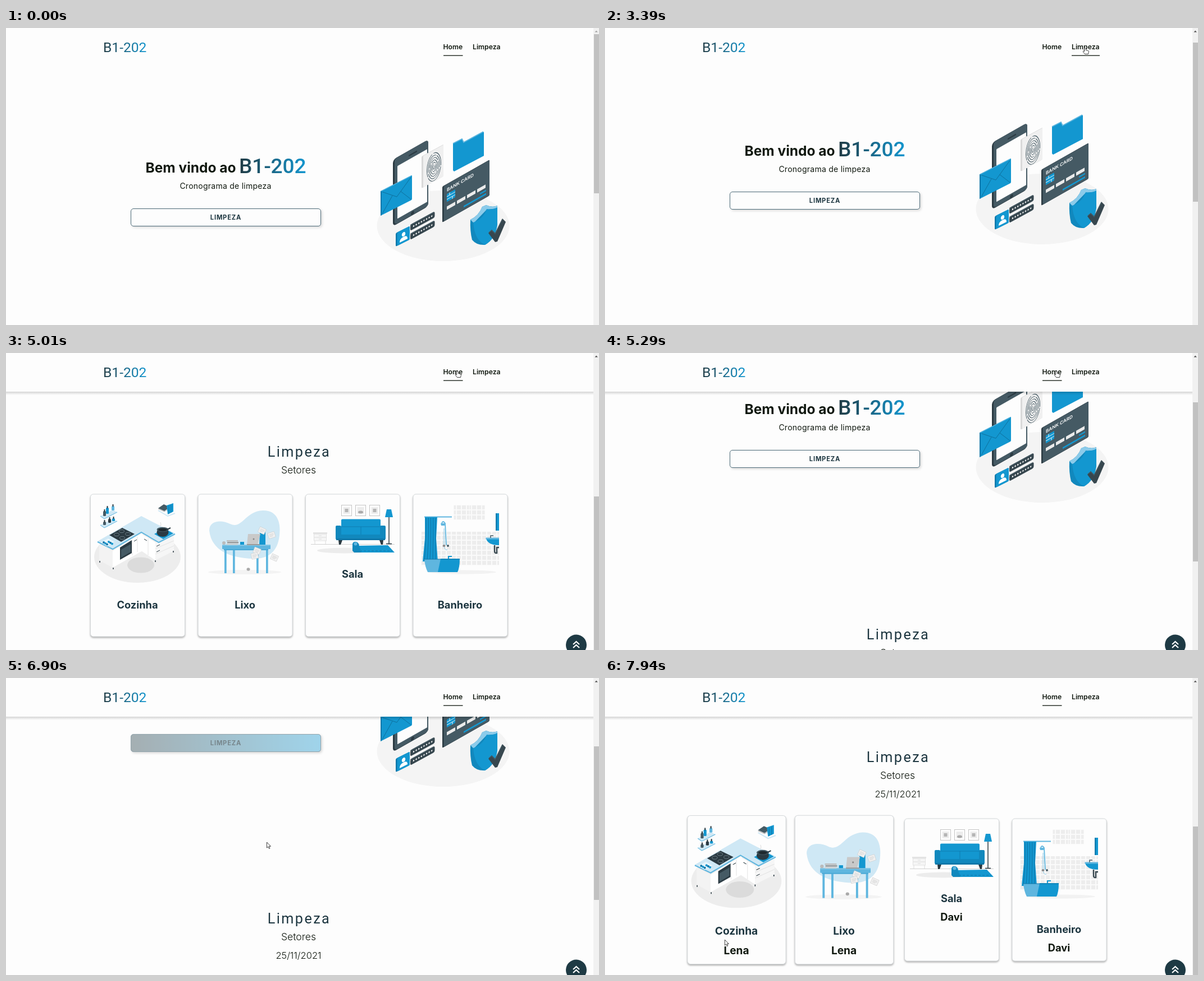
An HTML page that plays this animation: 1056x530 px, repeating every 8 s.

```html
<!DOCTYPE html>
<html lang="pt">
<head>
<meta charset="utf-8">
<title>B1-202</title>
<style>
html, body { margin: 0; width: 100%; height: 100%; overflow: hidden; background: #fdfdfd; }
svg { display: block; }
text { font-family: Inter, "Open Sans", sans-serif; }
.brand { font-family: Roboto, "Liberation Sans", sans-serif; }
.base { filter: drop-shadow(0 2.5px 1.5px rgba(0,0,0,.3)); }
.btn { filter: drop-shadow(2px 2px 2px rgba(0,0,0,.15)); }
</style>
</head>
<body>
<svg id="stage" width="1056" height="530" viewBox="0 0 1056 530"></svg>
<script>
const blue = '#1397d0', sky = '#5fb6df', pale = '#cfe8f5', deep = '#0f78aa', mild = '#1188bd';
const slate = '#455a64', dark = '#2b3a42', ink = '#1d3640', black = '#10180f';
const LOOP = 8000;

// Markup helpers
const P = (d, fill, more = '') => `<path d="${d}" fill="${fill}" ${more}/>`;
const L = (d, stroke, w = 1, more = '') => P(d, 'none', `stroke="${stroke}" stroke-width="${w}" ${more}`);
const R = (x, y, w, h, fill, rx = 0, more = '') =>
  `<rect x="${x}" y="${y}" width="${w}" height="${h}" fill="${fill}" rx="${rx}" ${more}/>`;
const E = (cx, cy, rx, ry, fill, more = '') =>
  `<ellipse cx="${cx}" cy="${cy}" rx="${rx}" ry="${ry}" fill="${fill}" ${more}/>`;
const T = (x, y, size, weight, text, fill = black, more = '') =>
  `<text x="${x}" y="${y}" font-size="${size}" font-weight="${weight}" fill="${fill}" ${more}>${text}</text>`;
const G = (attrs, body) => `<g ${attrs}>${body}</g>`;
const iso = (x, y, body, k = .55) => G(`transform="matrix(1 ${-k} 0 1 ${x} ${y})"`, body);
const rep = (n, f) => Array.from({ length: n }, (_, i) => f(i)).join('');
const mid = 'text-anchor="middle" ';

function heroArt() {
  const phone = R(0, 0, 63, 119, dark, 6) + R(3, 0, 60, 118, slate, 5) + R(8, 16, 53, 94, '#fdfdfd', 1) +
    R(28, 8, 15, 2.4, dark, 1) + E(35, 115, 3, 3, dark);
  const finger = R(0, 0, 39, 57, '#d9d9d9', 2) + R(3, 1, 36, 56, '#f0f0f0', 1) +
    rep(6, i => E(22, 31, 1.5 + 2.2 * i, 4 + 4.1 * i, 'none',
      `stroke="${slate}" stroke-width=".9" stroke-dasharray="${14 + 5 * i} 2" stroke-dashoffset="${i * 7}"`));
  const mail = R(0, 0, 56, 44, blue, 1.5) + R(0, 0, 2, 44, deep, 1) + R(1, 0, 54, 1.2, sky) +
    L('M3 3L29 25 54 3M3 42L21 19M54 42L36 19', '#0c6690', .7);
  const bank = R(0, 0, 84, 64, dark, 2) + R(2.5, .5, 81.5, 63, slate, 2) +
    T(8, 13.5, 8.1, 600, 'BANK CARD', '#fff') + R(8, 18, 15, 14, blue, 1) +
    L('M8 22.5h15M8 27.5h15M13 18v4.5M18 27.5v4.5', '#fff', .9) +
    rep(4, i => R(8 + 18 * i, 40, 15, 6, '#ebebeb', .5)) +
    R(38, 56, 40, 3, blue) + R(67, 50, 11, 2.5, blue);
  const bar = R(0, 0, 43.5, 11, '#37474f', 3) + R(0, 0, 42, 1.5, slate, 1) +
    rep(8, i => E(6 + 4.6 * i, 5.7, 1.2, 1.3, '#fff'));
  const user = R(0, 0, 25, 24, deep, 2) + R(2.5, 0, 22.5, 24, blue, 2) + E(14, 9, 3.2, 3.8, '#fff') +
    P('M7 20.5q0-7 7-7t7 7z', '#fff');
  return E(778.5, 353, 118, 63, '#f4f4f4') + iso(689, 235, phone, .57) + iso(740, 229, finger) +
    P('M796 206L812 198 815 204 849 185 851 186V228L798 256 796 254Z', blue) +
    L('M796 206L812 198 815 204 850 185', sky, 1.8) + iso(667, 291, mail, .51) + iso(777, 283, bank, .57) +
    iso(720, 351, bar) + iso(720, 367, bar) + iso(694, 366, user, .5) +
    P('M827 342Q842 335 848 319L855 316Q866 321 875 317V350Q872 376 853 387Q838 388 830 378Q826 362 827 342Z', mild) +
    P('M827 342Q842 335 848 319L855 316Q866 321 875 317V322L856 324 833 348Z', '#8bcbea') +
    P('M832 347Q850 341 856 323Q866 325 875 320V350Q872 376 853 387Q834 378 832 347Z', blue) +
    P('M859 366L865 360 871 366 884 340 890 346 875 381 871 382Z', '#37474f') +
    L('M860 365L865 361 871 367 884 341', slate, 1.5);
}

function kitchen() {
  const shelf = y => P(`M168 ${y}L190 ${y - 11} 198 ${y - 7} 175 ${y + 5}Z`, pale) +
    L(`M168 ${y}L175 ${y + 5} 198 ${y - 7}`, sky, 1);
  const jar = (x, y, h, c) => R(x, y - h, 5, h, c, 1.5) + R(x + 1.5, y - h - 3, 2, 4, dark);
  const ring = (x, y) => E(x, y, 4.5, 2.6, 'none', 'stroke="#7b8d96" stroke-width=".8"');
  return E(234, 363, 77, 46, '#ededed') + E(240, 377.5, 24, 14, '#dbdbdb') +
    shelf(290) + shelf(306) + jar(173, 290, 9, slate) + jar(178, 286, 11, blue) + jar(188, 280, 8, sky) +
    jar(173, 306, 6, slate) + jar(182, 302, 7, dark) + jar(189, 299, 5, blue) +
    P('M271 276L281 269 292 274 282 281Z', slate) + L('M271 277L282 282 291 276', '#aaa') +
    P('M286 271L298 267V282L288 287Z', blue) + L('M290 272V286M294 270V284', deep) +
    L('M271 280L288 290 301 285', pale, 2) +
    P('M166 340L190 352V382L166 369Z', '#f3f3f3') + P('M190 352L243 320V352L190 382Z', '#fff') +
    P('M241 322L266 337V369L241 352Z', '#fff') + P('M266 337L299 324V352L266 369Z', '#f6f6f6') +
    L('M225 332V360M234 327V354M253 330V360M266 348L299 334M266 358L299 343', '#dedede', .8) +
    L('M228 335l5-3M246 331l5 3M268 344l6-3M268 354l6-3', dark, 1) +
    P('M203 346L224 333V356L203 368Z', dark) + P('M205 350L222 340V354L205 364Z', slate) +
    P('M163 335L241 290 301 321 272 336 241 318 190 348Z', pale) +
    L('M163 336L190 349 241 319 272 337 301 322', sky, 2) +
    P('M184 324L207 311 229 322 205 336Z', dark) +
    ring(197, 323) + ring(206, 317) + ring(207, 329) + ring(217, 322) +
    P('M169 337L182 330 193 336 180 344Z', '#e9f5fb') +
    rep(6, i => E(174 + 3 * i, 337 + 2 * (i % 3) - i * .3, 2, 2, i % 2 ? blue : deep)) +
    P('M264 322L282 312 298 321 280 331Z', blue) + E(279, 319, 10.5, 8, dark) +
    E(279, 314, 10.5, 4.2, slate) + E(279, 314.5, 8, 2.8, '#1e292e') +
    L('M287 314l6-3', dark, 2) + L('M275 309q2-4 0-8', '#ddd') +
    L('M167 370v3M191 382v3M266 369v3M298 352v3', dark, 1.5);
}

function rubbish() {
  const sheet = (x, y, a) => G(`transform="translate(${x} ${y}) rotate(${a})"`,
    R(-6, -5, 12, 10, '#f2f2f2', 0, 'stroke="#ccc" stroke-width=".6"') + L('M-4 -2h8M-4 0h8M-4 2h6', '#c6c6c6', .6));
  return P('M362 316C362 296 386 297 399 304C421 314 425 282 457 280C482 279 490 300 487 324C484 356 464 367 440 366C400 365 366 352 362 316Z', pale) +
    E(425, 390, 65, 4, '#f3f3f3') +
    [389, 404, 446, 463].map(x => R(x, 349, 3.7, 43, sky)).join('') +
    R(388, 347, 79, 4, '#4ba9d6') + R(385, 341, 86, 8, sky, 1) + R(385, 341, 86, 2, '#83c6e6', 1) +
    P('M452 320L462 317V341H451Z', blue) + P('M431 322L453 322 448 341H429Z', '#c9c9c9') +
    P('M429 340H452V342H429Z', '#999') + E(441, 331, 1.5, 1.5, '#888') +
    rep(3, i => R(393 + i % 2, 333 + 3 * i, 20, 2.4, ['#bdbdbd', '#999', '#d2d2d2'][i])) +
    R(417, 336, 7, 5, blue) + E(388, 338, 3, 3, '#bbb') +
    sheet(456, 316, 25) + sheet(473, 324, -18) + sheet(447, 352, 22) + sheet(443, 361, -12) + sheet(478, 364, 24) +
    E(431.5, 385, 3, 2.8, '#aaa');
}

function lounge() {
  const frame = i => R(597.5 + 25 * i, 270.5, 18, 19, '#fff', 0, 'stroke="#c4c4c4"') +
    R(600.5 + 25 * i, 274, 12, 12, '#ececec') +
    (i === 1 ? E(631.5, 283, 4.5, 2.5, '#aaa') : R(603.5 + 25 * i, 277, 6, 6, '#b5b5b5'));
  return rep(3, frame) +
    R(547, 319, 25, 3, '#e4e4e4') + R(548.5, 322, 22, 12, '#f6f6f6', 0, 'stroke="#e2e2e2"') +
    L('M549 328h21M557 325h5M557 331h5M550 334v6M569 334v6', '#dcdcdc') +
    E(603, 351.5, 49, 5, '#ececec') + L('M543 340.5H692', '#d2d2d2') +
    R(597, 295.5, 70, 34, blue, 2) + L('M632 309V328M597 309H667', deep, .8) +
    R(587, 307, 10, 25, mild, 2) + R(666, 307, 10, 25, mild, 2) +
    R(597, 323, 70, 8, mild) + R(588, 330, 87, 3, deep) +
    P('M592 333h7l-3 8h-3zM665 333h7l-1 8h-3z', dark) +
    P('M678 278h8l3 14h-14z', blue) + L('M682 292V339M677 339.5h10', dark, 1.5) +
    P('M622 343L680 342 692 355 624 355Z', blue) + L('M630 352H688', deep, 1, 'stroke-dasharray="4 3"') +
    P('M617 352V340Q618 335 624 336Q629 338 629 344L633 355H620Z', mild) + E(622.5, 339.5, 3, 3, sky);
}

function bath() {
  return R(739, 318, 139, 60, 'url(#tile)') + R(797.5, 270, 27, 27, 'url(#tile)') + R(825.5, 270, 27, 27, 'url(#tile)') +
    E(812, 390, 61, 3.5, '#f2f2f2') + L('M745 291.5H794', sky, 2) +
    P('M746 292H768L766 330 769 371H742L746 330Z', blue) +
    rep(5, i => L(`M${748 + 4.2 * i} 293Q${749 + 4 * i} 330 ${745 + 5 * i} 370`, deep, 1.2)) +
    L('M776 303Q778 297 782 303L784 342', sky, 1.8) + P('M774 303h8l-1 4h-6z', sky) +
    L('M780 312V340Q780 352 786 350', '#8bcbea', 1) + E(780, 343, 2.5, 2, '#888') + E(787, 343, 2, 2, slate) +
    P('M745 367H775L770 390H751Q746 380 745 367Z', sky) + P('M774 366H808Q808 382 804 390H769Z', blue) +
    L('M744 367H808', deep, 1.2) + L('M788 366v-4h6', blue, 2) +
    R(872, 285, 6, 31, blue) + R(872, 285, 2, 31, deep) +
    P('M855 330H878V342Q858 342 855 330Z', blue) + R(854.5, 328.5, 23.5, 3, sky) + L('M863 329v-4h5', slate, 1.5) +
    L('M870 342V352Q870 357 874 356V346H878', '#37474f', 2.4);
}

const rooms = [['Cozinha', 'Lena', 448, kitchen], ['Lixo', 'Lena', 448, rubbish],
  ['Sala', 'Davi', 393, lounge], ['Banheiro', 'Davi', 448, bath]];
const cardX = i => 150.5 + 191.5 * i;

const cards = rooms.map(([title, name, y, art], i) => {
  const cx = cardX(i) + 83.5;
  return G(`id="card${i}"`, R(cardX(i), 251, 168, 254, '#fdfdfd', 5, 'class="base" stroke="#d5d9db"') + art() +
    T(cx, y + 6.5, 18.3, 700, title, ink, mid) +
    G('class="late"', T(cx, y + 40, 18.3, 700, name, black, mid)));
}).join('');

const grad = (id, stops, more = '') => `<linearGradient id="${id}" ${more}>${stops}</linearGradient>`;
const stop = (o, c, a = 1) => `<stop offset="${o}" stop-color="${c}" stop-opacity="${a}"/>`;
const defs = grad('tint', stop(0, '#203a43') + stop(1, blue)) +
  grad('shade', stop(0, '#000', .16) + stop(1, '#000', 0), 'x2="0" y2="1"') +
  `<pattern id="tile" width="9" height="9" patternUnits="userSpaceOnUse" x="739" y="315">${R(0, 0, 9, 9, '#fafafa')}${R(1, 1, 7, 7, '#ededed', .5)}</pattern>`;

const spaced = s => `letter-spacing="${s}"`;
const label = fill => T(391.5, 342, 11.2, 700, 'LIMPEZA', fill, mid + spaced(.8));
const hero = T(248.5, 257.5, 24.5, 700, 'Bem vindo ao') +
  T(415, 258.5, 37, 500, 'B1-202', 'url(#tint)', 'class="brand"') +
  T(391, 287, 14, 400, 'Cronograma de limpeza', black, mid + spaced(.25)) + heroArt() +
  R(222.5, 322.5, 338, 31, '#fdfdfd', 4.5, 'class="btn" stroke="#4c6a78"') + label(ink) +
  G('id="hover"', R(222, 322, 339, 32, '#fdfdfd', 5) + R(223, 323, 337, 30, 'url(#tint)', 4) + label('#fff'));

const sector = T(522, 184, 25.2, 400, 'Limpeza', ink, `class="brand" ${mid} ${spaced(2.4)}`) +
  T(521, 213.5, 17.6, 300, 'Setores', black, mid) +
  G('class="late"', T(521, 247, 16.5, 300, '25/11/2021', black, mid));

document.getElementById('stage').innerHTML = `<defs>${defs}</defs>` + R(0, 0, 1056, 530, '#fdfdfd') +
  G('id="page"', hero + G('transform="translate(0 476)"', sector + G('id="cards"', cards))) +
  G('id="shadow"', R(0, 69, 1046, 6, 'url(#shade)')) + R(0, 0, 1046, 69, '#fdfdfd') +
  T(173, 43, 24.6, 400, 'B1-202', 'url(#tint)', 'class="brand"') +
  T(778.5, 38.3, 12.2, 600, 'Home') + T(831, 38.3, 12.2, 600, 'Limpeza') +
  R(779, 48.5, 34.5, 1.3, black, 0, 'id="homeLine"') + R(831, 48.5, 50, 1.3, black, 0, 'id="cleanLine"') +
  G('id="top"', E(1015.5, 521, 18.5, 18.5, '#1e3a44') +
    L('M1010 520l5.500-5 5.500 5M1010 526l5.500-5 5.500 5', '#fff', 2.2)) +
  R(1046, 0, 10, 530, '#f1f1f1') + P('M1048.500 7.500l2.700-3 2.700 3z', '#505050', 'id="arrowUp"') +
  R(1047, 11, 9, 284, '#c1c1c1', 0, 'id="thumb"') +
  G('id="cursor" stroke="#111" stroke-linejoin="round"',
    P('M0 0V10L2.300 8 4 11.500 5.500 10.800 3.900 7.300H7Z', '#fff', 'id="arrow" stroke-width=".8"') +
    P('M-1.400 1.200Q0-.6 1.300 1.200V4.500L5.500 5.400Q6.600 5.800 6.400 7.200L5.500 11.500H-.5L-3.600 7.600Q-3.800 6-2.300 6.300L-1.400 7Z', '#fff', 'id="hand" stroke-width=".8"'));

const $ = id => document.getElementById(id);
const show = (el, on) => el.setAttribute('visibility', on ? 'visible' : 'hidden');
const late = document.querySelectorAll('.late');

const ramp = (t, a, d) => Math.min(1, Math.max(0, (t - a) / d));
const ease = p => p < .5 ? 2 * p * p : 1 - 2 * (1 - p) * (1 - p);

// Scroll moves: start, duration, distance
const moves = [[3306, 480, 476], [5000, 440, -424], [6650, 583, 458]];
const scrollAt = t => Math.round(moves.reduce((s, [a, d, by]) => s + by * ease(ramp(t, a, d)), 0));

// Pointer path: time, x, y
const path = [[480, 1052, 530], [750, 860, 330], [950, 604, 260], [1100, 640, 150], [1250, 646, 200],
  [1550, 820, 270], [1750, 1049, 170], [1880, 1049, 140], [2080, 922, 44], [2360, 908, 40], [2510, 918, 34],
  [2900, 880, 32], [3190, 855, 35], [3400, 855, 35], [3780, 853, 35], [4110, 853, 35], [4400, 822, 36],
  [4670, 801, 32], [4800, 800, 30], [4870, 804, 28], [5010, 804, 32], [5300, 804, 32], [5400, 780, 50],
  [5760, 490, 275], [6310, 464, 287], [6650, 464, 287], [7190, 465, 300], [7440, 465, 300],
  [7600, 462, 302], [7940, 213.5, 467], [LOOP, 205, 472]];
function pointAt(t) {
  const i = Math.max(1, path.findIndex(k => k[0] >= t));
  const [a, ax, ay] = path[i - 1], [b, bx, by] = path[i];
  const p = ramp(t, a, b - a);
  return [ax + (bx - ax) * p, ay + (by - ay) * p];
}
const within = (v, a, b) => v >= a && v <= b;

function draw(t) {
  const y = scrollAt(t), listed = t >= 6640, far = y > 69;
  const ratio = listed ? .498 : .515, thumbY = Math.round(11 + y * ratio);
  const [px, py] = pointAt(t);

  $('page').setAttribute('transform', `translate(0 ${-y})`);
  $('cards').setAttribute('transform', `translate(0 ${listed ? 34 : 0})`);
  late.forEach(el => show(el, listed));
  show($('shadow'), far);
  show($('top'), far);

  $('homeLine').setAttribute('width', 34.5 * (t < 3320 ? 1 : ramp(t, 4350, 250)));
  $('cleanLine').setAttribute('width', t < 5010 ? 50 * ramp(t, 2140, 250) : 0);
  $('hover').setAttribute('opacity', ramp(t, 5800, 400) - ramp(t, 6720, 300));

  const thumb = $('thumb');
  thumb.setAttribute('y', thumbY);
  thumb.setAttribute('height', listed ? 274 : 284);
  thumb.setAttribute('fill', px > 1046 && within(py, thumbY, thumbY + 284) ? '#a8a8a8' : '#c1c1c1');
  $('arrowUp').setAttribute('fill', y < 1 ? '#a3a3a3' : '#505050');

  const grow = [ramp(t, 7808, 310), ease(ramp(t, 7440, 280)) - ramp(t, 7770, 310)];
  grow.forEach((g, i) => $('card' + i).setAttribute('transform',
    `translate(${cardX(i) + 84} 378) scale(${1 + .1 * g}) translate(${-cardX(i) - 84} -378)`));

  const onNav = within(py, 24, 52) && (within(px, 778, 816) || within(px, 828, 884));
  const onButton = within(px, 222, 560) && within(py + y, 323, 353);
  const seen = t >= 480;
  $('cursor').setAttribute('transform', `translate(${px} ${py})`);
  show($('hand'), seen && (onNav || onButton));
  show($('arrow'), seen && !(onNav || onButton));
}

const start = performance.now();
function tick() {
  draw((performance.now() - start) % LOOP);
  requestAnimationFrame(tick);
}
tick();
</script>
</body>
</html>
```
